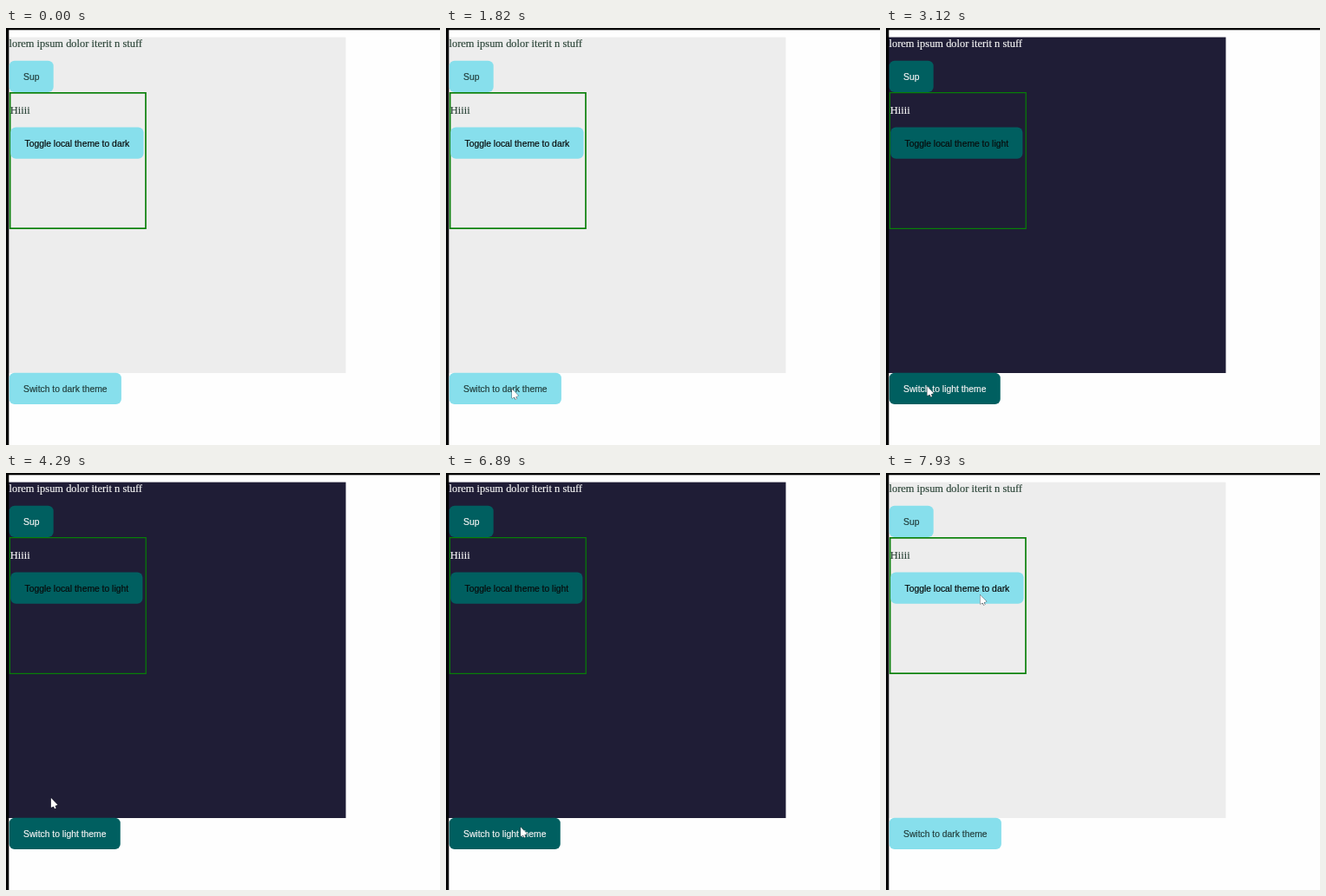
These frames come from a looping animation (500x481 px, 8000 ms). An HTML page with a canvas:

```html
<!DOCTYPE html>
<html lang="en">
<head>
<meta charset="utf-8">
<title>Theme toggle</title>
<style>
  html, body { margin: 0; width: 100%; height: 100%; overflow: hidden; background: #fefefe; }
  canvas { display: block; }
</style>
</head>
<body>
<canvas id="stage" width="500" height="481"></canvas>
<script>
const ctx = document.getElementById('stage').getContext('2d');
const LOOP = 8000, TICK = 130;
const SERIF = '12.45px "Liberation Serif", serif';
const SANS = '10.35px "Liberation Sans", sans-serif';

const LIGHT = {
  name: 'light', panel: '#ededed', text: '#30483c', button: '#87dfec',
  label: '#24403f', border: '#0a800a', line: 1.7
};
const DARK = {
  name: 'dark', panel: '#1f1d36', text: '#f2f2f2', button: '#005f60',
  label: '#f2f2f2', border: '#078007', line: 1.2
};

// The pointer enters, rests on the switch, then travels between both buttons.
const ENTRY = { x: 96, y: 440 };
const MOVES = [
  { start: 260, end: 910, x: 82, y: 417 },
  { start: 1430, end: 2600, x: 47, y: 413 },
  { start: 4130, end: 4810, x: 99, y: 138.5 },
  { start: 6370, end: 6890, x: 85.5, y: 408 },
  { start: 7280, end: 7930, x: 108, y: 140 }
];

const within = (t, from, to) => t >= from && t < to;
const progress = (t, from, to) => Math.min(1, Math.max(0, (t - from) / (to - from)));
const ease = u => u * u * (3 - 2 * u);
const mix = (a, b, u) => a + (b - a) * u;

// Sideways travel lags slightly, which bends the path.
function pointerAt(t) {
  return MOVES.reduce((from, move) => {
    const u = ease(progress(t, move.start, move.end));
    return { x: mix(from.x, move.x, u ** 1.25), y: mix(from.y, move.y, u) };
  }, ENTRY);
}

function rect(x, y, w, h, color) {
  ctx.fillStyle = color;
  ctx.fillRect(x, y, w, h);
}

function text(str, x, y, font, color) {
  ctx.font = font;
  ctx.fillStyle = ctx.strokeStyle = color;
  ctx.lineWidth = 0.2;
  ctx.fillText(str, x, y);
  ctx.strokeText(str, x, y);
}

function button(label, x, y, theme, color = theme.label) {
  const pad = 16.3, height = 36.3;
  ctx.font = SANS;
  ctx.fillStyle = theme.button;
  ctx.beginPath();
  ctx.roundRect(x, y, ctx.measureText(label).width + pad * 2, height, 6.2);
  ctx.fill();
  text(label, x + pad, y + height / 2 + 4, SANS, color);
}

function frameBox(x, y, size, line, color) {
  ctx.strokeStyle = color;
  ctx.lineWidth = line;
  ctx.strokeRect(x + line / 2, y + line / 2, size - line, size - line);
}

function pointer({ x, y }) {
  const head = new Path2D('M0 0V10.6L7.4 7.7Z');
  const tail = new Path2D('M2.8 7L4.9 11.8');
  const stroke = (path, width, color) => {
    ctx.lineWidth = width;
    ctx.strokeStyle = color;
    ctx.stroke(path);
  };
  ctx.save();
  ctx.translate(x + 0.5, y + 0.5);
  stroke(tail, 2.6, '#3c3c44');
  stroke(head, 0.8, '#3c3c44');
  ctx.fillStyle = '#fff';
  ctx.fill(head);
  stroke(tail, 1.5, '#fff');
  ctx.restore();
}

function draw(t) {
  const page = within(t, 3120, 7280) ? DARK : LIGHT;
  const local = within(t, 5330, 6110) ? LIGHT : page;
  const other = theme => theme === LIGHT ? DARK.name : LIGHT.name;

  rect(0, 0, 500, 481, '#fefefe');
  rect(3, 10.6, 388.5, 387.4, page.panel);
  rect(0, 0, 500, 2.3, '#000');
  rect(0, 0, 3.3, 481, '#000');

  text('lorem ipsum dolor iterit n stuff', 3.5, 22, SERIF, page.text);
  button('Sup', 3.7, 37.8, page);

  rect(4, 74, 158, 158, local.panel);
  frameBox(3.8, 74, 158, local.line, local === page ? page.border : '#1ca01c');
  text('Hiiii', 4.8, 99, SERIF, local.text);
  button(`Toggle local theme to ${other(local)}`, 5.2, 114.4, local, '#080c0c');

  button(`Switch to ${other(page)} theme`, 3.7, 397.8, page);

  if (t >= 390) pointer(pointerAt(t));
}

function frame(now) {
  const t = now % LOOP;
  draw(Math.floor(t / TICK) * TICK);
  requestAnimationFrame(frame);
}
requestAnimationFrame(frame);
</script>
</body>
</html>
```
